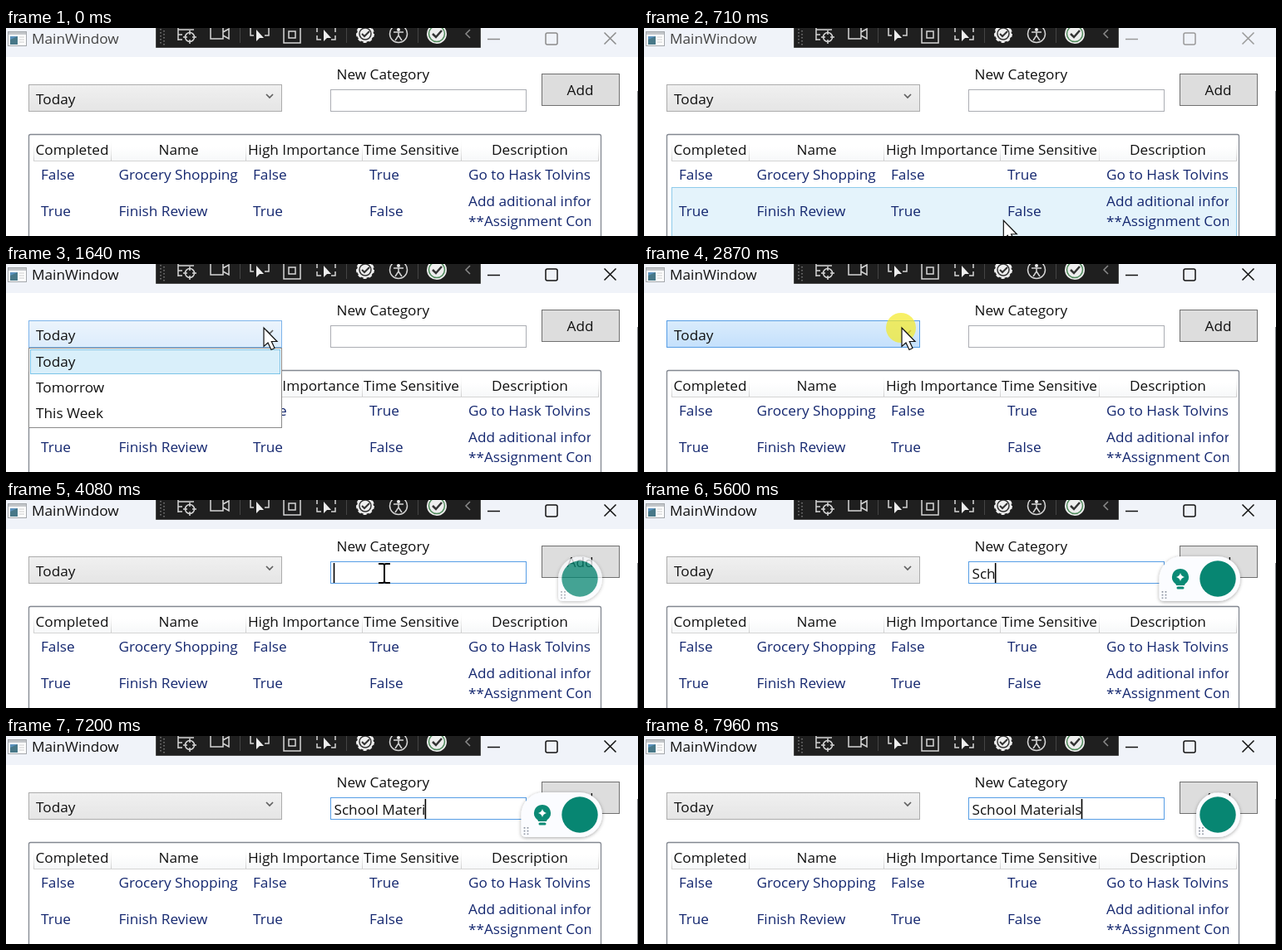
Write an HTML page that moves like this. It is 760x251 px and loops after 8 s.

```html
<!DOCTYPE html>
<html lang="en">
<head>
<meta charset="utf-8">
<title>MainWindow</title>
<style>
  html, body { margin: 0; width: 100%; height: 100%; overflow: hidden; background: #fff; }
  svg { display: block; width: 760px; height: 251px; }
  text { font: 17.2px "Open Sans", "Noto Sans", sans-serif; fill: #111; white-space: pre; }
  .mid { text-anchor: middle; }
  .cells text { fill: #14276f; }
  .line { fill: none; stroke-width: 1; }
  .icon { fill: none; stroke: #d6d6d6; stroke-width: 1.5; }
</style>
</head>
<body>
<svg viewBox="0 0 760 251" xmlns="http://www.w3.org/2000/svg">
  <defs>
    <linearGradient id="normal" x2="0" y2="1"><stop stop-color="#f0f0f0"/><stop offset="1" stop-color="#e5e5e5"/></linearGradient>
    <linearGradient id="hover" x2="0" y2="1"><stop stop-color="#ecf4fc"/><stop offset="1" stop-color="#dcecfc"/></linearGradient>
    <linearGradient id="pressed" x2="0" y2="1"><stop stop-color="#daecfc"/><stop offset="1" stop-color="#c4e0fc"/></linearGradient>
    <linearGradient id="header" x2="0" y2="1"><stop offset=".4" stop-color="#fff"/><stop offset="1" stop-color="#f7f8f9"/></linearGradient>
    <linearGradient id="fade" x2="0" y2="1"><stop stop-color="#fff" stop-opacity="0"/><stop offset="1" stop-color="#ccc"/></linearGradient>
    <filter id="shadow" x="-30%" y="-30%" width="160%" height="160%">
      <feDropShadow dx="0" dy="1" stdDeviation="2.2" flood-opacity=".35"/>
    </filter>
    <clipPath id="cell"><rect x="550" y="160" width="153" height="91"/></clipPath>
    <clipPath id="popupClip"><rect id="popupArea" x="24" y="101" width="312" height="0"/></clipPath>
  </defs>

  <rect width="760" height="251" fill="#fff"/>
  <rect width="760" height="35" fill="#f0f3f9"/>

  <!-- title bar -->
  <rect x="2.500" y="4.500" width="22" height="17" fill="#fff" stroke="#a3a7ab"/>
  <path d="M3 5h21v3H3z" fill="#c3c6ca"/>
  <path d="M5 10h9v10H5z" fill="#5b92bd"/>
  <path d="M5 20V14l9-4v10z" fill="#487888"/>
  <path d="M16 11h6M16 14h6M16 17h6" class="line" stroke="#ccc"/>
  <text id="title" x="31" y="19">MainWindow</text>
  <g id="buttons" fill="none" stroke-width="1.500">
    <path d="M579 13.500h15"/>
    <rect x="649" y="6" width="14" height="14" rx="2"/>
    <path d="M719.500 5.500l14 14m0-14l-14 14"/>
  </g>

  <!-- debug toolbar -->
  <path d="M180.500-1V23.500H570.500V-1" fill="#1f1f1f" stroke="#454545"/>
  <path d="M186 1v18M190 3v18" stroke="#777" stroke-width="1.600" stroke-dasharray="1.600 2.400"/>
  <path d="M281.500 0v18M409.500 0v18M495.500 0v18" class="line" stroke="#444"/>
  <g transform="translate(0 1)">
    <g class="icon">
      <path d="M207-1v15M207 1h8M207 7h5M207 13h5M214 1h12"/>
      <circle cx="221" cy="10" r="5.500"/><path d="M221 2v5M221 13v5M213 10h5M224 10h5"/>
      <path d="M246-1v13h15V-1M261 4l7-4v12l-7-4"/>
      <path d="M294-1v9h4M316-1v9h-5"/>
      <path d="M334-1v18h20V-1"/><rect x="340" y="3" width="8" height="8"/>
      <path d="M374-1v5M374 8v5h5M396-1v5M396 8v5h-5"/>
      <circle cx="472" cy="6" r="10.500"/><path d="M466 4h12M472 4v4l-4 6M472 8l4 6"/>
      <path d="M558 1l-5 5 5 5" stroke="#8a8a8a"/>
    </g>
    <g fill="#eee">
      <path d="M301 1v14l4-4h5z"/><path d="M382 1v14l4-4h5z"/>
      <circle cx="472" cy="1" r="2"/>
      <circle cx="432" cy="6" r="10" stroke="#eee" stroke-width="2" stroke-dasharray="4 3"/>
      <circle cx="518" cy="6" r="12"/>
    </g>
    <g fill="none" stroke="#333">
      <circle cx="432" cy="6" r="7" stroke-width="1.500"/>
      <path d="M428 6l3 3 6-6" stroke-width="2"/>
      <circle cx="518" cy="6" r="9.500" stroke="#4f8a5b" stroke-width="1.500"/>
      <path d="M513 6l4 4 7-8" stroke-width="2.500"/>
    </g>
  </g>

  <!-- form -->
  <rect id="combo" x="27.500" y="68.500" width="304" height="32"/>
  <text x="36" y="92">Today</text>
  <path d="M313 80l4 4 4-4" fill="none" stroke="#606060" stroke-width="1.700"/>
  <text x="397.500" y="62">New Category</text>
  <rect id="box" x="390.500" y="74.500" width="235" height="26" fill="#fff"/>
  <text id="entry" x="394.500" y="95"></text>
  <path id="caret" d="M0 76v24" stroke="#000" stroke-width="1.600"/>
  <rect x="644.500" y="55.500" width="93" height="38" fill="#ddd" stroke="#707070"/>
  <text x="690.500" y="81" class="mid">Add</text>
  <path d="M759.500 76v175" class="line" stroke="#85888c"/>

  <!-- task list -->
  <path d="M27.500 252V130.500q0-2 2-2H713.500q2 0 2 2V252" fill="#fff" stroke="#828790" stroke-width="1.300"/>
  <rect x="33" y="133" width="680" height="27" fill="url(#header)"/>
  <path d="M33 160.500H713" class="line" stroke="#d5d5d5"/>
  <path d="M33 133h1v27h-1zM126 133h1v27h-1zM288 133h1v27h-1zM428 133h1v27h-1zM547 133h1v27h-1zM712 133h1v27h-1z" fill="url(#fade)"/>
  <rect id="row" x="33.500" width="679" fill="#e4f3fb" stroke="#8fcbeb"/>
  <g class="mid">
    <text x="79.500" y="153">Completed</text>
    <text x="207.500" y="153">Name</text>
    <text x="358" y="153">High Importance</text>
    <text x="487.500" y="153">Time Sensitive</text>
    <text x="630" y="153">Description</text>
  </g>
  <g class="cells">
    <text x="42" y="183">False</text>
    <text x="135.500" y="183">Grocery Shopping</text>
    <text x="297" y="183">False</text>
    <text x="437" y="183">True</text>
    <text x="42" y="227">True</text>
    <text x="135.500" y="227">Finish Review</text>
    <text x="297" y="227">True</text>
    <text x="437" y="227">False</text>
    <g clip-path="url(#cell)">
      <text x="556" y="183">Go to Hask Tolvins</text>
      <text x="556" y="215">Add aditional information</text>
      <text x="556" y="239">**Assignment Complete</text>
    </g>
  </g>

  <!-- category popup -->
  <g clip-path="url(#popupClip)">
    <rect x="27.500" y="101.500" width="304" height="96" fill="#fff" stroke="#8a8a8a"/>
    <rect x="29.500" y="103.500" width="300" height="29" fill="#d9effa" stroke="#7cc4e8"/>
    <text x="36" y="124">Today</text>
    <text x="36" y="155">Tomorrow</text>
    <text x="36" y="186">This Week</text>
  </g>

  <!-- writing helper -->
  <g id="helper">
    <path id="pill" fill="#fbfcff" filter="url(#shadow)"/>
    <g id="bulb" fill="#0b8a75">
      <path d="M645 83a10 10 0 0 1 6 18q-1 1-1 2h-10q0-1-1-2a10 10 0 0 1 6-18z"/>
      <rect x="640.500" y="104.500" width="9" height="3" rx="1.500"/>
      <path d="M645 88q1 4 5 5q-4 1-5 5q-1-4-5-5q4-1 5-5z" fill="#fff"/>
    </g>
    <circle cx="690" cy="95" r="21.700" fill="#078672"/>
    <path id="grip" d="M0 0v9M4 0v9" stroke="#8c93a0" stroke-width="1.700" stroke-dasharray="1.700 2"/>
  </g>

  <!-- pointer -->
  <circle id="click" r="18" fill="#f4ea2c"/>
  <path id="arrow" d="M0 0V22.500L5 18l4 8.500 4-2L9.300 16.500H16z" fill="#fff" stroke="#111" stroke-width="1.200"/>
  <path id="beam" d="M-7-11h5q2 0 2 2q0-2 2-2h5M0-10V11M-7 12h5q2 0 2-2q0 2 2 2h5" fill="none" stroke="#000" stroke-width="2"/>
</svg>
<script>
const LOOP = 8000, BLINK = 530;
const TEXT = "School Materials";
const KEY_TIMES = [5140, 5370, 5520, 5750, 5930, 6080, 6210, 6480,
                   6670, 6820, 6960, 7080, 7200, 7320, 7430, 7540];
const CLICKS = [[1410, 310, 77], [2870, 309, 77], [3540, 455, 87]];
const FOCUS = 3540, CARET_START = 3620, HELPER_START = 4080;

const el = Object.fromEntries([...document.querySelectorAll("svg [id]")].map(e => [e.id, e]));
const set = (node, attrs) => {
  for (const name in attrs) node.setAttribute(name, attrs[name]);
};
const show = (node, on) => set(node, { visibility: on ? "visible" : "hidden" });
const ramp = (t, from, to) => Math.min(1, Math.max(0, (t - from) / (to - from)));
const smooth = p => p * p * (3 - 2 * p);
const mix = (a, b, p) => a + (b - a) * p;
const between = (t, from, to) => t >= from && t < to;

function pointerAt(t) {
  if (t < 1240) {
    const enter = smooth(ramp(t, 580, 1160)), settle = ramp(t, 1165, 1240);
    return [mix(450, 314, enter) - 4 * settle, mix(255, 80, enter) - 3 * settle];
  }
  const move = smooth(ramp(t, 2960, 3300));
  return [mix(310, 455, move), mix(77, 88, move)];
}

function drawWindow(t) {
  const active = t >= 1410;
  set(el.title, { style: `fill:${active ? "#111" : "#444"}` });
  set(el.buttons, { stroke: active ? "#111" : t < 80 ? "#8b8b8b" : "#999" });
}

function drawPointer(t, x, y) {
  const overBox = x > 390 && x < 626 && y > 74 && y < 101;
  show(el.arrow, between(t, 620, KEY_TIMES[0]) && !overBox);
  show(el.beam, overBox && between(t, 2960, KEY_TIMES[0]));
  for (const node of [el.arrow, el.beam]) set(node, { transform: `translate(${x} ${y})` });

  const click = CLICKS.find(([at]) => between(t, at, at + 220));
  show(el.click, click);
  if (click) {
    const [at, cx, cy] = click;
    set(el.click, { cx, cy, opacity: 0.72 * (1 - ramp(t, at + 70, at + 220)) });
  }
}

function drawControls(t, x, y) {
  const overCombo = t >= 620 && x < 332 && y > 68 && y < 101;
  const pressed = between(t, 1410, 1560) || between(t, 2870, 2960);
  const state = pressed ? "pressed" : overCombo ? "hover" : "normal";
  const edge = { normal: "#acacac", hover: "#7eb4ea", pressed: "#569de5" };
  set(el.combo, { fill: `url(#${state})`, stroke: edge[state] });

  const open = t < 2870 ? smooth(ramp(t, 1430, 1640)) : 0;
  set(el.popupArea, { height: 98 * open });

  const overBox = x > 390 && t > 2960;
  set(el.box, { stroke: t >= FOCUS ? "#569de5" : overBox ? "#7eb4ea" : "#abadb3" });

  const first = y < 192;
  show(el.row, between(t, 620, 1240) && y > 162);
  set(el.row, { y: first ? 162.5 : 192.5, height: first ? 29 : 60 });
}

function drawEntry(t) {
  const count = KEY_TIMES.filter(at => at <= t).length;
  el.entry.textContent = TEXT.slice(0, count);
  const since = t - (count ? KEY_TIMES[count - 1] : CARET_START);
  show(el.caret, t >= FOCUS && Math.floor(Math.max(0, since) / BLINK) % 2 === 0);
  const width = count ? el.entry.getComputedTextLength() : 0;
  set(el.caret, { transform: `translate(${394.5 + width} 0)` });
}

function drawHelper(t) {
  show(el.helper, t >= HELPER_START);
  set(el.helper, { opacity: mix(0.75, 1, ramp(t, HELPER_START, HELPER_START + 140)) });
  const grow = smooth(ramp(t, 4150, 4450)) * (1 - smooth(ramp(t, 7250, 7560)));
  const left = mix(664, 619.5, grow);
  set(el.pill, {
    d: `M690 68a27 27 0 0 1 0 54H${left + 6}q-6 0-6-6V95a27 27 0 0 1 27-27z`
  });
  set(el.bulb, { opacity: ramp(grow, 0.6, 1) });
  set(el.grip, { transform: `translate(${left + 4} 110)` });
}

function render(t) {
  const [x, y] = pointerAt(t);
  drawWindow(t);
  drawControls(t, x, y);
  drawEntry(t);
  drawHelper(t);
  drawPointer(t, x, y);
}

function tick() {
  render(performance.now() % LOOP);
  requestAnimationFrame(tick);
}
tick();
</script>
</body>
</html>
```
